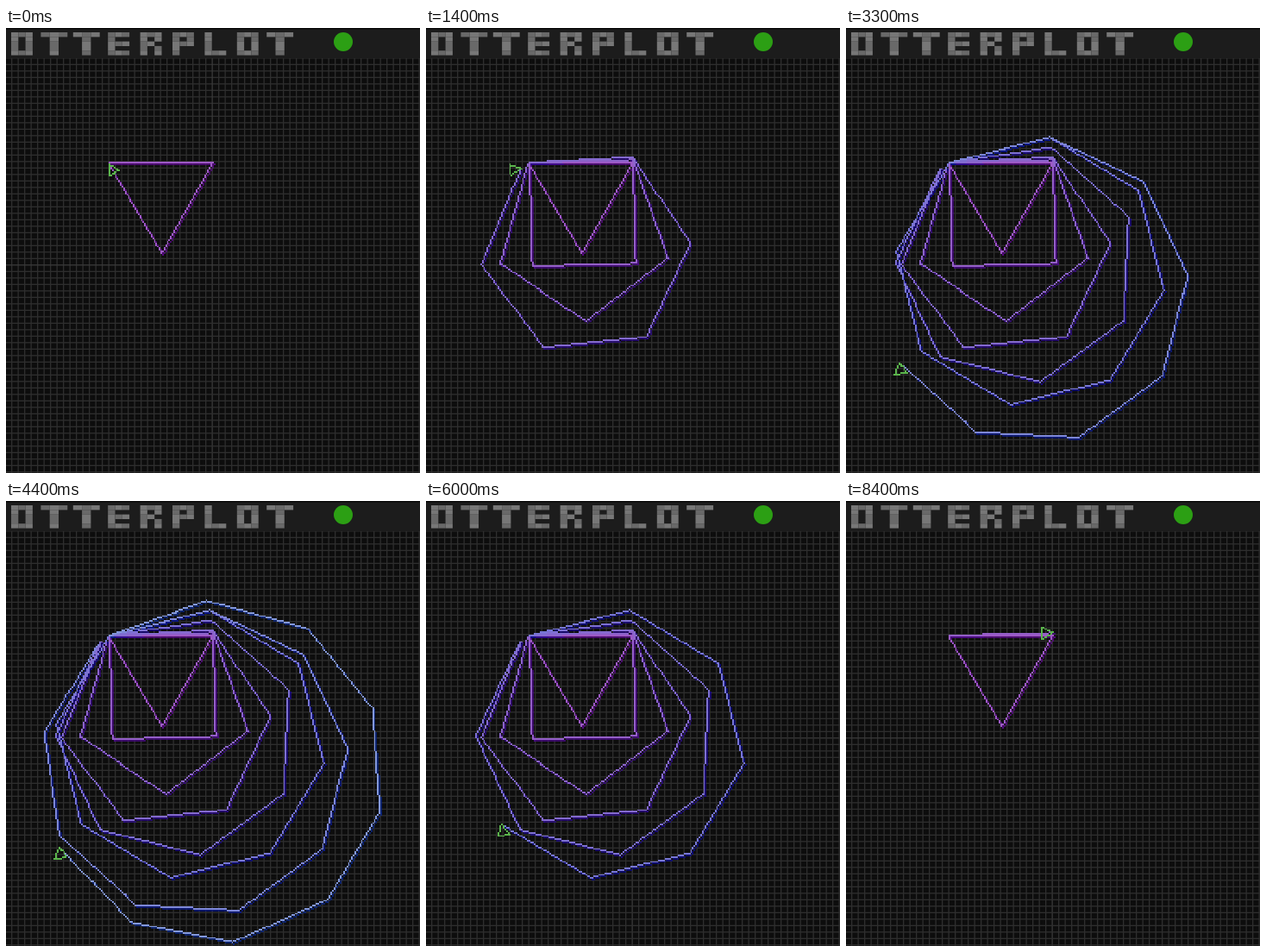
Recreate the animation shown at these times as an HTML page with a canvas. Size 480 by 516 pixels, loop 8500 ms.

```html
<!DOCTYPE html>
<html lang="en">
<head>
<meta charset="utf-8">
<title>Turtle polygons</title>
<style>
  html, body { margin: 0; width: 100%; height: 100%; overflow: hidden; background: #0d0d0d; }
  canvas { position: absolute; left: 0; top: 0; }
  #plot { left: -1px; top: 35px; width: 480px; height: 480px; image-rendering: pixelated; }
</style>
</head>
<body>
<canvas id="back" width="480" height="516"></canvas>
<canvas id="plot" width="256" height="256"></canvas>
<script>
const back = document.getElementById('back').getContext('2d');
const plot = document.getElementById('plot').getContext('2d');

function box(x, y, w, h, color) {
  back.fillStyle = color;
  back.fillRect(x, y, w, h);
}

const GLYPHS = {
  O: '####.##.##.####',
  T: '###.#..#..#..#.',
  E: '####..####..###',
  R: '####.###.#.##.#',
  P: '####.#####..#..',
  L: '#..#..#..#..###'
};

function drawTitle(text) {
  [...text].forEach((letter, i) => {
    const w = letter === 'T' ? 10.3 : 8.3;
    const left = 3 + i * 37.4 + (letter === 'T' ? 0 : 3);
    [...GLYPHS[letter]].forEach((dot, k) => {
      const col = k % 3, row = Math.floor(k / 3);
      if (dot === '#') {
        box(left + col * w, 5 + row * 5.3, w, 5.4, (i + col + (row >> 1)) % 2 ? '#696969' : '#777');
      }
    });
  });
}

function drawBackground() {
  box(0, 0, 480, 516, '#0d0d0d');
  for (let k = 0; k <= 64; k++) {
    const color = k === 32 ? '#3a3a3a' : '#2e2e2e';
    box(k * 7.5 - 1.5, 35, 1.3, 481, color);
    box(0, 35 + k * 7.5 - 0.8, 480, 1.3, color);
  }
  box(0, 0, 480, 35, '#1c1c1c');
  box(0, 0, 480, 1.5, '#080808');
  drawTitle('OTTERPLOT');
  back.fillStyle = '#2c9f14';
  back.beginPath();
  back.arc(391, 16, 11, 0, 7);
  back.fill();
}

// Angles are whole units, 256 to a full turn, so most polygons do not quite close.
const START = 64, SIDE = 64, TURN_DELAY = 0.8;
const LAG = { 3: -2, 4: 1.3, 5: 2.1 };

function buildEvents() {
  const events = [];
  let clock = 0, heading = 0;
  for (let n = 3; n <= 10; n++) {
    const lag = LAG[n] ?? 1.7;
    let x = START, y = START;
    if (n === 3) clock = -6 - lag;
    events.push({ at: clock + Math.max(lag, 0) / 2, x, y, heading });
    clock += lag;
    for (let i = 0; i < n; i++) {
      const a = heading * Math.PI / 128;
      const nx = x + SIDE * Math.cos(a), ny = y + SIDE * Math.sin(a);
      events.push({ at: clock, x: nx, y: ny, heading, line: [x, y, nx, ny], n });
      [x, y] = [nx, ny];
      heading += Math.floor(256 / n);
      events.push({ at: clock + TURN_DELAY, x, y, heading });
      clock += 2;
    }
  }
  return events;
}

function dotLine(x0, y0, x1, y1, color) {
  const steps = Math.ceil(Math.max(Math.abs(x1 - x0), Math.abs(y1 - y0)));
  plot.fillStyle = color;
  for (let i = 0; i <= steps; i++) {
    const t = i / steps;
    plot.fillRect(Math.round(x0 + (x1 - x0) * t), Math.round(y0 + (y1 - y0) * t), 1, 1);
  }
}

function drawCursor({ x, y, heading }) {
  const a = heading * Math.PI / 128, c = Math.cos(a), s = Math.sin(a);
  const corner = side => [x - 6.8 * c - side * 3.6 * s, y - 6.8 * s + side * 3.6 * c];
  const left = corner(-1), right = corner(1);
  const color = '#5bb54c';
  dotLine(x, y, ...left, color);
  dotLine(...left, ...right, color);
  dotLine(...right, x, y, color);
}

function lineColors(n) {
  const k = n - 3, hue = 278 - 7.5 * k;
  return {
    line: `hsl(${hue}, ${48 + k}%, ${56 + 1.8 * k}%)`,
    shade: `hsla(${hue}, 85%, 29%, 0.75)`
  };
}

const events = buildEvents();

function drawPlot(step) {
  const moment = -1.25 + 2.5875 * step;
  const done = events.filter(e => e.at <= moment);
  const edges = done.filter(e => e.line);
  plot.clearRect(0, 0, 256, 256);
  for (const { line: [x0, y0, x1, y1], n } of edges) {
    dotLine(x0 + 1, y0 + 1, x1 + 1, y1 + 1, lineColors(n).shade);
  }
  for (const { line, n } of edges) dotLine(...line, lineColors(n).line);
  drawCursor(done[done.length - 1]);
}

// The drawing grows for half the loop, then is undone the same way.
const TICK = 100, TICKS = 85;
let shown = -1;

function render(now) {
  const tick = Math.floor(now / TICK) % TICKS;
  const step = Math.min(tick, TICKS - tick);
  if (step !== shown) drawPlot(shown = step);
  requestAnimationFrame(() => render(performance.now()));
}

drawBackground();
render(performance.now());
</script>
</body>
</html>
```
